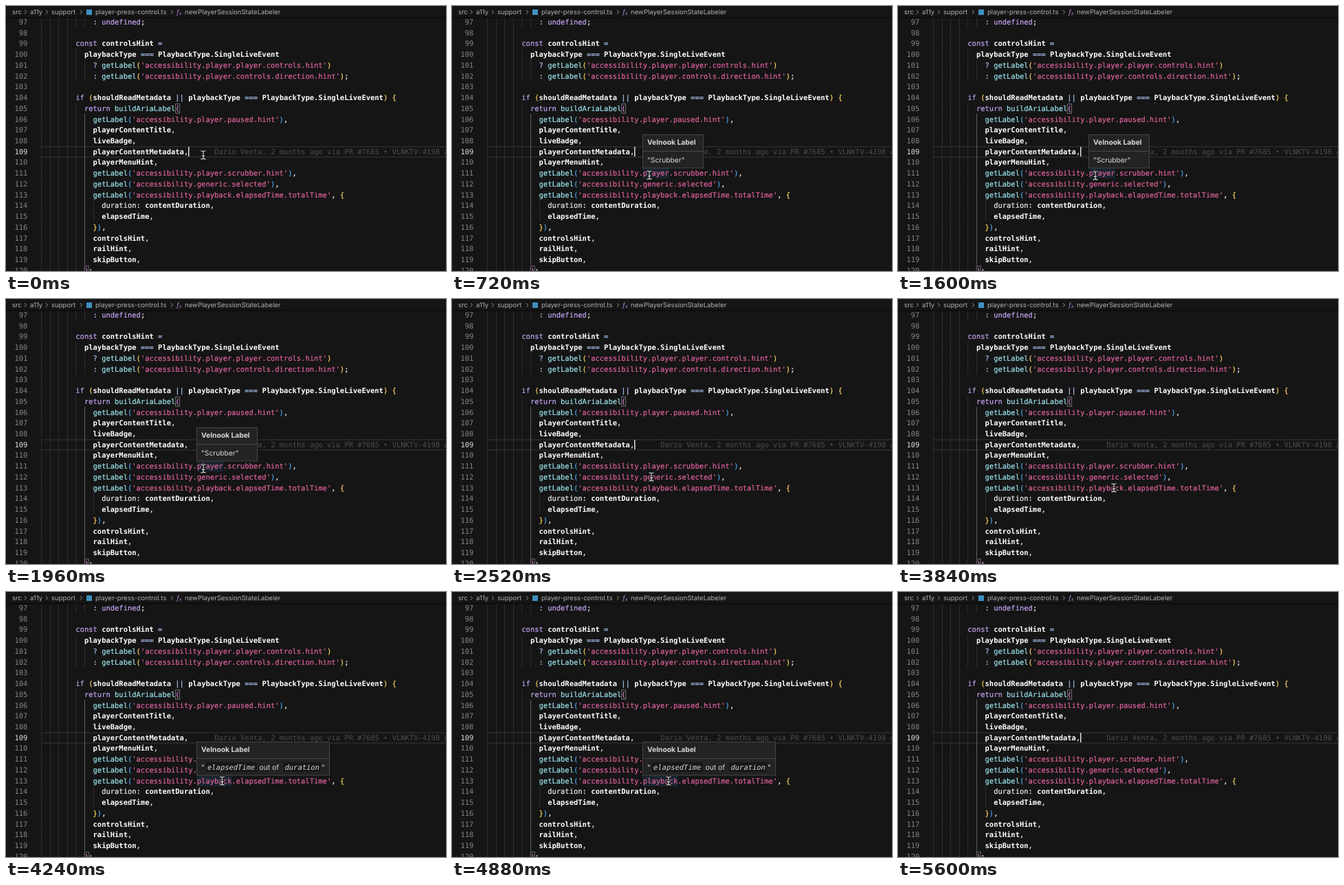
Write an HTML page that moves like this. It is 640 by 386 pixels and loops after 5.64 s.

```html
<!DOCTYPE html>
<html lang="en">
<head>
<meta charset="utf-8">
<style>
  html, body { margin: 0; width: 100%; height: 100%; overflow: hidden; background: #151515; }
  svg { display: block; width: 100%; height: 100%; }
  text { white-space: pre; text-rendering: geometricPrecision; fill: currentColor; }
  .code { font: 10.48px "DejaVu Sans Mono", monospace; color: #f0f0f0; }
  .code tspan { fill: currentColor; stroke: currentColor; stroke-width: .2; }
  .ui { font: 9.57px Inter, sans-serif; color: #b0b0b0; }
  .tip { font: 10.3px Inter, sans-serif; color: #d8d8d8; }
  .tip .title { font-weight: 700; }
  .tip .var { font: italic 10.48px "DejaVu Sans Mono", monospace; }
  .code .name { font-weight: 700; color: #fff; stroke: none; }
  .key { color: #c3a4f3; }
  .op { color: #a9c4f2; }
  .fn { color: #9be3ec; }
  .str { color: #e0629d; }
  .num { color: #858585; }
  .now { color: #e0e0e0; }
  .ghost { color: #4d4d4d; }
  .pair0 { color: #ffd75e; }
  .pair1 { color: #d884d8; }
  .pair2 { color: #4aa8ee; }
  .rule { fill: none; stroke: #2d2d2d; stroke-width: 1.6; }
  .beam { fill: none; stroke-linecap: round; }
</style>
</head>
<body>
<svg viewBox="0 0 640 386" preserveAspectRatio="none"></svg>
<script>
const LOOP = 5640, FIRST = 97, ACTIVE = 109, LEFT = 50.9, CHAR = 6.309, ROW = 15.73;
const colX = col => LEFT + col * CHAR;
const baseY = line => 27 + (line - FIRST) * ROW;
const topY = line => baseY(line) - 11.6;

const rows = `            : undefined;

        const controlsHint =
          playbackType === PlaybackType.SingleLiveEvent
            ? getLabel('accessibility.player.player.controls.hint')
            : getLabel('accessibility.player.controls.direction.hint');

        if (shouldReadMetadata || playbackType === PlaybackType.SingleLiveEvent) {
          return buildAriaLabel(
            getLabel('accessibility.player.paused.hint'),
            playerContentTitle,
            liveBadge,
            playerContentMetadata,
            playerMenuHint,
            getLabel('accessibility.player.scrubber.hint'),
            getLabel('accessibility.generic.selected'),
            getLabel('accessibility.playback.elapsedTime.totalTime', {
              duration: contentDuration,
              elapsedTime,
            }),
            controlsHint,
            railHint,
            skipButton,
          );`.split('\n');

let depth = 0;
function styleOf(token) {
  if (/^[({]/.test(token)) return 'pair' + depth++ % 3;
  if (/^[)}]/.test(token)) return 'pair' + --depth % 3;
  if (token[0] === "'") return 'str';
  if (/^(const|if|return|undefined)$/.test(token)) return 'key';
  if (/^[=|?:]+$/.test(token)) return 'op';
  if (/^(getLabel|buildAriaLabel)$/.test(token)) return 'fn';
  return /^[\w.]+$/.test(token) ? 'name' : '';
}
const paint = code => code.replace(/'[^']*'|\w+:|[\w.]+|[=|]+|[^\w\s']/g,
  token => `<tspan class="${styleOf(token)}">${token}</tspan>`);

const text = (cls, x, y, body, extra = '') =>
  `<text class="${cls}" x="${x}" y="${y}" ${extra}>${body}</text>`;
const box = (x, y, w, h, attrs) =>
  `<rect x="${x}" y="${y}" width="${w}" height="${h}" ${attrs}/>`;
const path = (d, attrs) => `<path d="${d}" ${attrs}/>`;
const bracket = (col, line) => box(colX(col) + .2, topY(line) + 1.5, 6, 13.5,
  'fill="none" stroke="#858585" stroke-width=".8"');

function editor() {
  let out = path(`M${LEFT} 205H640M${LEFT} 220H640`, 'class="rule"');
  rows.forEach((code, i) => {
    const line = FIRST + i, y = baseY(line);
    const indent = code ? code.search(/\S/) : 8;
    for (let col = 0; col < indent; col += 2) {
      const inCall = col === 10 && line > 105;
      out += box(Math.round(colX(col)), topY(line), 1, ROW, `fill="${inCall ? '#606060' : '#2d2d2d'}"`);
    }
    out += text('code ' + (line === ACTIVE ? 'now' : 'num'), 31.3, y, line, 'text-anchor="end"');
    out += text('code', LEFT, y, paint(code));
  });
  return out + bracket(31, 105) + bracket(10, 120) + text('code ghost', colX(40), baseY(ACTIVE),
    'Dario Venta, 2 months ago via PR #7685 • VLNKTV-4198 add labels');
}

function breadcrumbs() {
  let out = box(0, 0, 640, 16, 'fill="#151515"') + box(0, 16, 640, 1.5, 'fill="#0b0b0b"');
  [[9, 'src'], [35, 'a11y'], [66, 'support'], [130, 'player-press-control.ts'],
   [260, 'newPlayerSessionStateLabeler']].forEach(([x, s]) => out += text('ui', x, 12, s));
  [27, 58, 108, 240].forEach(x => out += path(`M${x} 6l2.6 2.8l-2.6 2.8`,
    'fill="none" stroke="#999" stroke-width="1"'));
  out += box(117, 5, 8, 8, 'fill="#3f8fc0"');
  return out + text('ui', 248, 11.5, 'ƒ<tspan font-size="7" dy="1.5">x</tspan>',
    'style="color:#b180d7;font-style:italic"');
}

const tip = (id, y, width, body) => `<g id="${id}" class="tip" transform="translate(277 ${y})">
  ${box(.5, .5, width, 48.5, 'fill="#232324" stroke="#454545"')}
  ${path(`M1 24.5h${width - 1}`, 'stroke="#484848"')}
  ${text('title', 7, 15.2, 'Velnook Label')}${body}</g>`;
const chip = (x, word) => box(x - 2, 30, word.length * CHAR + 4, 14, 'rx="2" fill="#171718"')
  + text('var', x, 41, word);
const mark = (id, line, length) => box(colX(36), topY(line), length * CHAR, ROW,
  `id="${id}" fill="#264f78" fill-opacity=".28"`);

const beam = 'M-3.2 -6Q0 -6 0 -4Q0 -6 3.2 -6M0 -4V4M-3.2 6Q0 6 0 4Q0 6 3.2 6M-1.8 1.5H1.8';

const svg = document.querySelector('svg');
svg.innerHTML = mark('mark1', 111, 6) + mark('mark2', 113, 8) + editor() + breadcrumbs()
  + box(colX(34) - .4, topY(ACTIVE) + 1, 1.5, 14, 'id="caret" fill="#e0e0e0"')
  + tip('tip1', 187, 88, text('', 7, 41, '"Scrubber"'))
  + tip('tip2', 218, 193, text('', 7, 41, '"') + chip(16, 'elapsedTime')
    + text('', 91.5, 41, 'out of') + chip(128.5, 'duration') + text('', 182, 41, '"'))
  + `<g id="mouse">${path(beam, 'class="beam" stroke="#151515" stroke-width="3"')}${
    path(beam, 'class="beam" stroke="#e0e0e0" stroke-width="1.1"')}</g>`;

// Pointer path: time, x, y
const stops = [[0, 287, 217], [60, 287, 217], [400, 287, 246], [1500, 287, 247], [2160, 287, 247],
  [2480, 290, 259], [3400, 290, 259], [3760, 314, 275], [4880, 315, 275], [5040, 315, 275],
  [5360, 322, 400], [LOOP, 322, 400]];
function pointer(t) {
  const i = stops.findIndex(s => s[0] > t);
  const [t0, x0, y0] = stops[i - 1], [t1, x1, y1] = stops[i];
  const u = (t - t0) / (t1 - t0), k = u * u * (3 - 2 * u);
  return [x0 + (x1 - x0) * k, y0 + (y1 - y0) * k];
}

const byId = id => document.getElementById(id);
const show = (id, on) => byId(id).setAttribute('visibility', on ? 'visible' : 'hidden');
function draw() {
  const t = performance.now() % LOOP;
  const first = t >= 560 && t < 2340, second = t >= 4080 && t < 5160;
  show('tip1', first);
  show('mark1', first);
  show('tip2', second);
  show('mark2', second);
  show('caret', (t + 15) % 500 < 250);
  byId('mouse').setAttribute('transform', `translate(${pointer(t)})`);
  requestAnimationFrame(draw);
}
draw();
</script>
</body>
</html>
```
